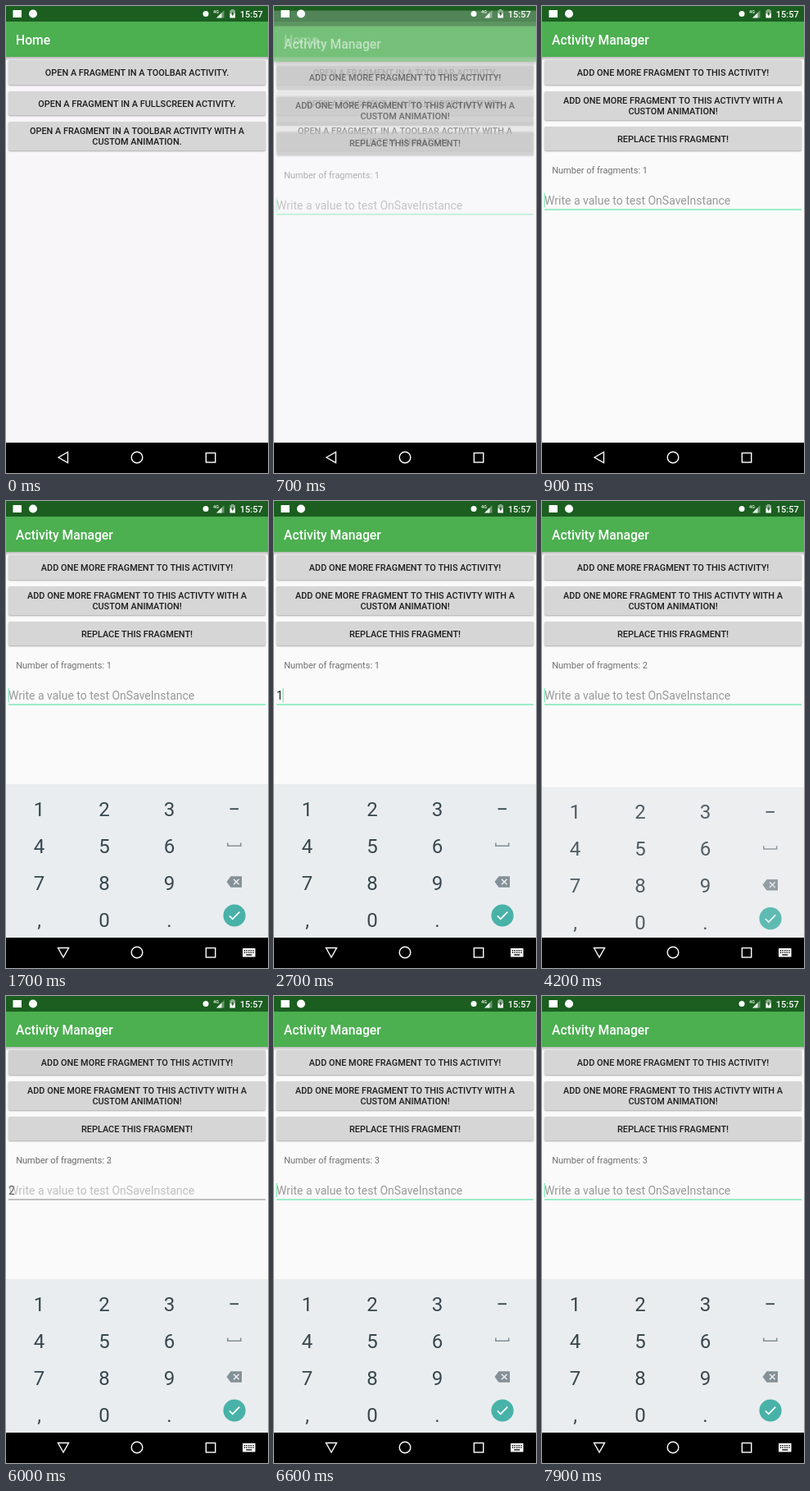
Write an HTML page with a canvas that moves like this. It is 320 px wide and 569 px high and loops after 8 s.

```html
<!DOCTYPE html>
<html lang="en">
<head>
<meta charset="utf-8">
<title>Activity Manager</title>
<style>
html, body { margin: 0; width: 100%; height: 100%; overflow: hidden; background: #fafafa; }
canvas { display: block; width: 100vw; height: 100vh; }
</style>
</head>
<body>
<canvas id="stage"></canvas>
<script>
const W = 320, H = 569, LOOP = 8000, NAV_Y = 532;
const canvas = document.getElementById('stage');
const g = canvas.getContext('2d');
const scale = window.devicePixelRatio || 1;
canvas.width = W * scale;
canvas.height = H * scale;

const FONT = 'Roboto, "Noto Sans", sans-serif';
const ACCENT = '#8eecbf';

const HOME = [
  { y: 66, h: 30, lines: ['OPEN A FRAGMENT IN A TOOLBAR ACTIVITY.'] },
  { y: 104, h: 29, lines: ['OPEN A FRAGMENT IN A FULLSCREEN ACTIVITY.'] },
  { y: 141, h: 35, lines: ['OPEN A FRAGMENT IN A TOOLBAR ACTIVITY WITH A', 'CUSTOM ANIMATION.'] }
];
const MANAGER = [
  { y: 66, h: 30, lines: ['ADD ONE MORE FRAGMENT TO THIS ACTIVITY!'] },
  { y: 104, h: 35, lines: ['ADD ONE MORE FRAGMENT TO THIS ACTIVTY WITH A', 'CUSTOM ANIMATION!'] },
  { y: 147, h: 29, lines: ['REPLACE THIS FRAGMENT!'] }
];

const OPEN = 600;
const SHOW = [1350, 4050], HIDE = 2800;
const SWAPS = [3650, 5850], SWAP_MS = 250;
const PRESSES = [500, 3400, 5800];
const CURSOR = [[700, 2000], [2500, 3300], [3950, 4700], [5000, 5800], [6200, 7100], [7600, 8000]];

const ramp = (t, start, ms) => Math.min(1, Math.max(0, (t - start) / ms));
const decel = (p, n = 3) => 1 - Math.pow(1 - p, n);

function group(alpha, dx, dy, draw) {
  if (alpha <= 0) return;
  g.save();
  g.globalAlpha *= alpha;
  g.translate(dx, dy);
  draw();
  g.restore();
}

function rect(x, y, w, h, color) {
  g.fillStyle = color;
  g.fillRect(x, y, w, h);
}

function disc(x, y, r, color) {
  g.fillStyle = color;
  g.beginPath();
  g.arc(x, y, r, 0, 7);
  g.fill();
}

function path(points, closed = true) {
  g.beginPath();
  points.forEach(([x, y]) => g.lineTo(x, y));
  if (closed) g.closePath();
}

function text(str, x, y, size, color, weight = 400, align = 'left') {
  g.font = `${weight} ${size}px ${FONT}`;
  g.textAlign = align;
  g.fillStyle = color;
  g.fillText(str, x, y);
}

function toolbar(title) {
  const shade = g.createLinearGradient(0, 62, 0, 67);
  shade.addColorStop(0, 'rgba(0,0,0,.26)');
  shade.addColorStop(1, 'rgba(0,0,0,0)');
  rect(0, 62, W, 5, shade);
  rect(0, 0, W, 19, '#1b5e20');
  rect(0, 19, W, 43, '#4caf50');
  text(title, 12, 46.5, 15.7, '#fff', 500);
}

function button({ y, h, lines }, press) {
  g.save();
  g.shadowColor = 'rgba(0,0,0,.32)';
  g.shadowBlur = 2 * scale;
  g.shadowOffsetY = scale;
  g.fillStyle = '#d6d6d7';
  g.beginPath();
  g.roundRect(3, y, 314, h, 1.8);
  g.fill();
  g.restore();
  if (press) rect(3, y, 314, h, `rgba(0,0,0,${0.1 * press})`);
  const first = y + h / 2 + 4 - (lines.length - 1) * 6.5;
  lines.forEach((line, i) => text(line, 160, first + i * 13, 10.9, '#1c1c1c', 500, 'center'));
}

function pressAt(t, start) {
  return t >= start && t < start + 220 ? Math.sin(Math.PI * (t - start) / 220) : 0;
}

function home(t) {
  rect(0, 0, W, NAV_Y, '#f8f6f9');
  toolbar('Home');
  HOME.forEach((b, i) => button(b, i ? 0 : pressAt(t, PRESSES[0])));
}

function fields(count, value) {
  text('Number of fragments: ' + count, 12.2, 204, 11, '#717171');
  if (value) text(value, 3, 242, 14, '#212121');
  else text('Write a value to test OnSaveInstance', 3, 242, 14, '#999');
}

function manager(t) {
  rect(0, 0, W, NAV_Y, '#fafafa');
  toolbar('Activity Manager');
  const press = Math.max(pressAt(t, PRESSES[1]), pressAt(t, PRESSES[2]));
  MANAGER.forEach((b, i) => button(b, i ? 0 : press));

  const value = t >= 2500 && t < SWAPS[0] + SWAP_MS ? '1'
    : t >= 5300 && t < SWAPS[1] + SWAP_MS ? '2' : '';
  const count = 1 + SWAPS.filter(s => t >= s + SWAP_MS).length;
  const swap = SWAPS.find(s => t >= s && t < s + SWAP_MS);
  if (swap === undefined) {
    fields(count, value);
  } else {
    const p = (t - swap) / SWAP_MS;
    group(1 - p ** 3, 0, 0, () => fields(count, value));
    group(p, 0, 0, () => fields(count + 1, ''));
  }

  const focused = !SWAPS.some(s => t >= s && t < s + 300);
  if (focused) rect(3, 247.2, 314, 1.7, ACCENT);
  else rect(3, 247.5, 314, 1, '#858585');
  if (CURSOR.some(([a, b]) => t >= a && t < b)) rect(value ? 10.5 : 2.5, 228, 1.4, 17.5, ACCENT);
}

function keyboard() {
  rect(0, 345, W, 200, '#eaedef');
  const ink = '#37474f';
  ['123', '456', '789', ',0.'].forEach((row, r) => {
    [...row].forEach((key, c) => text(key, 40.5 + c * 79.5, 383.5 + r * 45, 24, ink, 400, 'center'));
  });
  rect(273.5, 374.3, 10.5, 1.8, ink);

  const gray = '#849097';
  g.strokeStyle = gray;
  g.lineWidth = 1.6;
  path([[270.8, 416.5], [270.8, 420.3], [286.7, 420.3], [286.7, 416.5]], false);
  g.stroke();

  g.fillStyle = gray;
  path([[269.5, 464], [274.5, 457.3], [288, 457.3], [288, 470.7], [274.5, 470.7]]);
  g.fill();
  g.strokeStyle = '#eaedef';
  path([[278, 460.7], [284.6, 467.3]], false);
  g.stroke();
  path([[284.6, 460.7], [278, 467.3]], false);
  g.stroke();

  disc(279, 505, 13.6, '#48b2a8');
  g.strokeStyle = '#fff';
  g.lineWidth = 1.7;
  path([[272.8, 505.3], [276.8, 509.3], [285.2, 500.7]], false);
  g.stroke();
}

function statusIcons() {
  rect(8.5, 5, 10.5, 9, '#fff');
  disc(33, 9.5, 5, '#fff');
  disc(244, 9.5, 3.5, '#fff');
  text('4G', 253, 8.5, 5.5, '#fff', 500);
  g.fillStyle = 'rgba(255,255,255,.35)';
  path([[257, 14.5], [266.5, 14.5], [266.5, 5]]);
  g.fill();
  g.fillStyle = '#e4efe5';
  path([[257, 14.5], [263.5, 14.5], [263.5, 8]]);
  g.fill();
  rect(275, 4, 3.4, 1.5, '#8fb092');
  rect(273.4, 5.2, 6.6, 4, '#8fb092');
  rect(273.4, 9, 6.6, 5.5, '#fff');
  g.fillStyle = '#1b5e20';
  path([[277.2, 6.2], [275, 10.3], [276.4, 10.3], [276.2, 13], [278.5, 9], [277.2, 9]]);
  g.fill();
  text('15:57', 285.8, 13.8, 11, '#fff', 500);
}

function navBar(t) {
  rect(0, NAV_Y, W, H - NAV_Y, '#000');
  g.strokeStyle = '#fff';
  g.lineWidth = 1.4;
  const turn = ramp(t, 1230, 120) - ramp(t, HIDE, 120) + ramp(t, 3930, 120);
  g.save();
  g.translate(70, 550);
  g.rotate(-turn * Math.PI / 2);
  path([[-6, 0], [5.5, -6.5], [5.5, 6.5]]);
  g.stroke();
  g.restore();
  g.beginPath();
  g.arc(160, 550, 6.8, 0, 7);
  g.stroke();
  g.strokeRect(244.3, 544.6, 11.4, 11.4);

  if ((t >= 1400 && t < HIDE + 100) || t >= 3980) {
    rect(289, 545, 15.5, 10.5, '#fff');
    for (let r = 0; r < 2; r++)
      for (let c = 0; c < 5; c++) rect(290.8 + c * 2.6, 547 + r * 2.5, 1.4, 1.4, '#000');
    rect(293.3, 552.3, 7, 1.3, '#000');
  }
}

function keyboardLayer(t) {
  const start = t < SHOW[1] ? SHOW[0] : SHOW[1];
  const p = ramp(t, start, 350);
  const out = start === SHOW[0] ? ramp(t, HIDE, 250) : 0;
  const alpha = Math.min(1, p * 2) * (1 - out);
  group(alpha, 0, 20 * (1 - decel(p)) + 20 * out * out, keyboard);
}

function draw(t) {
  g.setTransform(scale, 0, 0, scale, 0, 0);
  const p = ramp(t, OPEN, 300);
  if (p < 1) home(t);
  group(Math.min(1, p * 1.6), 0, 45 * (1 - decel(p, 5)), () => manager(t));
  keyboardLayer(t);
  statusIcons();
  navBar(t);
}

function tick() {
  draw(performance.now() % LOOP);
  requestAnimationFrame(tick);
}
tick();
</script>
</body>
</html>
```
